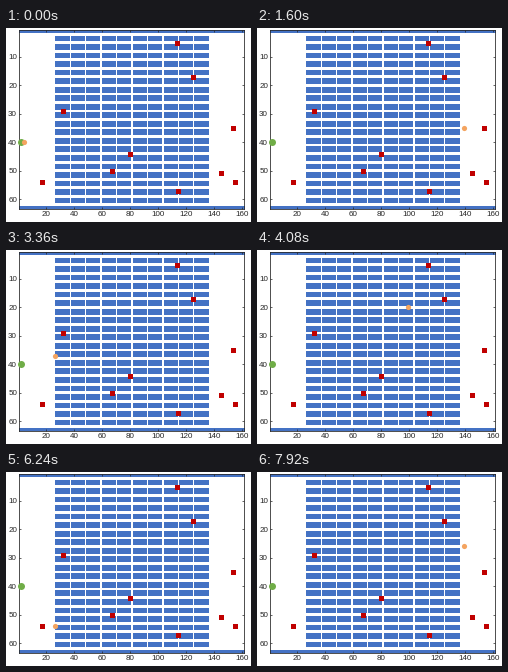
Recreate the animation shown at these times as a matplotlib script. Size 245 px wide and 194 px high, loop 8 s.

```python
import numpy as np
import matplotlib.pyplot as plt
from matplotlib.animation import FuncAnimation
from matplotlib.colors import ListedColormap

W, H, DPI = 245, 194, 100
COLS, ROWS = 161, 63
FRAMES, INTERVAL, STRIDE = 100, 80, 10
BLUE, RED, GREEN, ORANGE, INK = "#4472c4", "#c00000", "#70ad47", "#f4a460", "#262626"
LEFT, RIGHT, TOP, BOTTOM = 13, 238.4, 2, 181

DEPOT, GATE = (2, 40), (3, 40)
FIRST, DETOUR, LOW = (32, 29), (99, 20), (114, 57)
UPPER = [(113, 5), (125, 17), (153, 35), (155, 54), (145, 51)]
LOWER = [(80, 44), (67, 50), (17, 54)]

# One round of the robot; a repeated point is a one-step stop.
ROUND = [UPPER[0], (125, 5), UPPER[1], (139, 26), (139, 35), *UPPER[2:],
         (137, 44), LOWER[0], LOWER[0], LOWER[1], (26, 54), LOWER[2]]
STOPS = [GATE, FIRST, *ROUND, FIRST, DETOUR, *ROUND, LOW, LOW, *ROUND]

Y, X = np.mgrid[0:ROWS + 1, 0:COLS + 1]
SHELF = ((X > 26) & (X < 136) & ((X - 26) % 11 > 0)
         & (Y > 2) & (Y < 62) & (Y % 3 != 2))
WALL = (Y == 1) | (Y == ROWS)


def neighbours(cell):
    x, y = cell
    for nx, ny in ((x + 1, y), (x - 1, y), (x, y + 1), (x, y - 1)):
        if 1 < nx < COLS and 1 < ny < ROWS and not SHELF[ny, nx]:
            yield nx, ny


def distances(goal, start):
    """Steps to the goal for all cells at least as near as the start."""
    steps, ring = {goal: 0}, [goal]
    while start not in steps:
        nearest, ring = ring, []
        for cell in nearest:
            for other in neighbours(cell):
                if other not in steps:
                    steps[other] = steps[cell] + 1
                    ring.append(other)
    return steps


def leg(start, goal):
    """Shortest way round the shelves that stays near the straight line."""
    if start == goal:
        return [goal]
    steps, cell, cells = distances(goal, start), start, []
    dx, dy = goal[0] - start[0], goal[1] - start[1]

    def off_line(c):
        return abs((c[0] - start[0]) * dy - (c[1] - start[1]) * dx)

    while cell != goal:
        closer = [c for c in neighbours(cell) if steps.get(c) == steps[cell] - 1]
        cell = min(closer, key=off_line)
        cells.append(cell)
    return cells


def px(size):
    return size * 72 / DPI


plt.rcParams["font.family"] = "Liberation Sans"
fig = plt.figure(figsize=(W / DPI, H / DPI), dpi=DPI, facecolor="white")
ax = fig.add_axes([LEFT / W, 1 - BOTTOM / H, (RIGHT - LEFT) / W, (BOTTOM - TOP) / H])
ax.imshow((SHELF | WALL)[1:, 1:].astype(int), cmap=ListedColormap(["white", BLUE]),
          aspect="auto", interpolation="nearest",
          extent=(0.5, COLS + 0.5, ROWS + 0.5, 0.5))
ax.set_xticks(range(20, 161, 20))
ax.set_yticks(range(10, 61, 10))
ax.tick_params(direction="in", top=True, right=True, length=px(2), width=px(0.7),
               pad=px(2), labelsize=px(8), color=INK, labelcolor=INK)
for spine in ax.spines.values():
    spine.set(color=INK, linewidth=px(0.8))


def marker(points, shape, size, color, z):
    xs, ys = zip(*points)
    return ax.plot(xs, ys, shape, ms=px(size), color=color, mew=0,
                   zorder=z, clip_on=False)[0]


marker([FIRST, LOW, *UPPER, *LOWER], "s", 5, RED, 3)
marker([DEPOT], "o", 7, GREEN, 4)
robot = marker([GATE], "o", 5.2, ORANGE, 5)

path = [GATE]
for start, goal in zip(STOPS, STOPS[1:]):
    path += leg(start, goal)


def update(frame):
    x, y = path[STRIDE * frame + 1]
    robot.set_data([x], [y])
    return robot,


anim = FuncAnimation(fig, update, frames=FRAMES, interval=INTERVAL,
                     repeat=True, repeat_delay=0)
plt.show()
```
